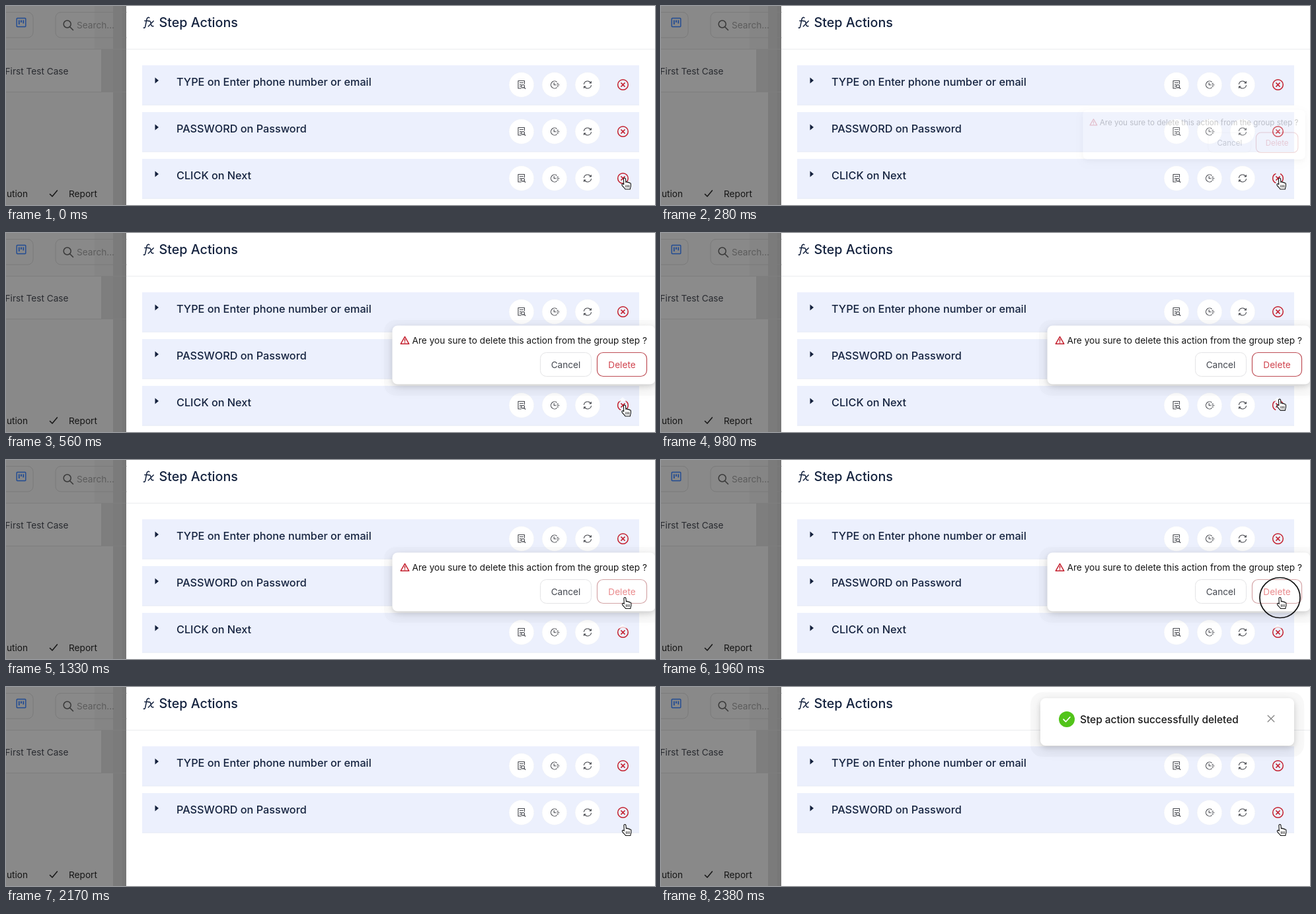
These frames come from a looping animation (982x302 px, 3500 ms). An HTML page:

```html
<!DOCTYPE html>
<html lang="en">
<head>
<meta charset="utf-8">
<title>Delete a step action</title>
<style>
html, body { margin: 0; width: 100%; height: 100%; overflow: hidden; background: #fff; }
svg { display: block; width: 982px; height: 302px; font-family: Inter, Roboto, sans-serif; }
.line { fill: none; stroke-linecap: round; stroke-linejoin: round; }
.icon { stroke: #45474d; stroke-width: 1.1; }
.red { stroke: #c4202e; stroke-width: 1.5; }
.body { font-size: 13.65px; }
.row { font-size: 16.24px; font-weight: 500; fill: #15233f; }
.card { fill: #fff; filter: drop-shadow(0 3px 4px rgba(0,0,0,.12)) drop-shadow(0 5px 9px rgba(0,0,0,.09)); }
</style>
</head>
<body>
<svg viewBox="0 0 982 302">
  <rect width="982" height="302" fill="#fff"/>

  <g id="backdrop">
    <rect width="182" height="302" fill="#898989"/>
    <rect y="66" width="182" height="64" fill="#8b8b8b"/>
    <path d="M134 0h48v66h-48z" fill="#858585"/>
    <path d="M144 66h38v64h-38z" fill="#7e7e7e"/>
    <path d="M162 0h20v302h-20z" fill="#7b7b7b"/>
    <path d="M176 0h6v302h-6z" fill="#777"/>
    <path d="M0 65.5H182M0 130.5H182" stroke="#7e7e7e"/>
    <g class="line" stroke="#7b7b7b">
      <path d="M-2 9.500H33a8 8 0 0 1 8 8V40a8 8 0 0 1-8 8H-2"/>
      <path d="M182 9.500H83a8 8 0 0 0-8 8V40a8 8 0 0 0 8 8H182"/>
    </g>
    <g class="line" stroke="#204b93" stroke-width="1.400">
      <rect x="16.200" y="18.500" width="13.600" height="13" rx="1"/>
      <path d="M19.800 21.500V28M23 21.500V25M26.300 21.500V26.500" stroke-width="1.800" stroke-linecap="butt"/>
    </g>
    <g class="line" stroke="#393939" stroke-width="1.500">
      <circle cx="92.700" cy="27.500" r="5.500"/><path d="M97 32l4.500 4.500"/>
    </g>
    <path class="line" d="M66.500 285.500l3.500 3.500 7.500-9" stroke="#161616" stroke-width="1.500"/>
    <g class="body" fill="#292b30">
      <text x="107" y="34" fill="#5c5c5c">Search...</text>
      <text x="94.500" y="103.500" text-anchor="end">First Test Case</text>
      <text x="33" y="289.500" text-anchor="end" fill="#151515">ution</text>
      <text x="95" y="289.500" fill="#151515">Report</text>
    </g>
  </g>

  <g class="line" stroke="#15233f" stroke-width="1.500">
    <path d="M217 17.800C214.800 16.600 213.300 18 212.800 20.800L210.900 30.500C210.500 32.900 209.700 33.600 208.200 33.100M209.800 22.500H215.600"/>
    <path d="M215.800 23C218.300 22 218.600 24 219.200 26.500S220.300 31.600 223 30.500M223.200 22.800L215.300 31"/>
  </g>
  <text x="231.500" y="32" font-size="19.700" font-weight="500" fill="#15233f">Step Actions</text>
  <path d="M182 65.500H982" stroke="#ebecef"/>

  <g id="rows"></g>

  <g id="popover">
    <rect x="572" y="132" width="424" height="115" rx="18" fill="#000" opacity=".015"/>
    <path d="M926.500 255.500l6.500-6.500 6.500 6.500z" fill="#fff" opacity=".7"/>
    <rect class="card" x="584.500" y="140.500" width="398" height="89" rx="8"/>
    <g class="line red" stroke-width="1.300">
      <path d="M603.500 157.300L609.800 168.300H597.200Z"/><path d="M603.500 161.300v3M603.500 166.300v.1"/>
    </g>
    <g class="body">
      <text x="614.500" y="168" font-size="13.700" fill="#161616">Are you sure to delete this action from the group step ?</text>
      <rect x="808.500" y="181.500" width="77" height="36" rx="9" fill="#fff" stroke="#e4e4e6"/>
      <text x="847" y="204.500" text-anchor="middle" fill="#43474f">Cancel</text>
      <rect id="deleteBox" x="894.500" y="181.500" width="75" height="36" rx="9" fill="#fff" stroke-width="1.200"/>
      <text id="deleteText" x="932" y="204.500" text-anchor="middle">Delete</text>
    </g>
  </g>

  <g id="toast">
    <rect x="559" y="8" width="414" height="98" rx="18" fill="#000" opacity=".025"/>
    <rect class="card" x="574" y="17" width="384" height="72" rx="8"/>
    <circle cx="614" cy="49" r="12" fill="#52c41a"/>
    <path class="line" d="M609 49.200l3.500 3.500 6.300-7" stroke="#fff" stroke-width="1.700"/>
    <text x="634" y="54.800" font-size="15.450" font-weight="500" fill="#1a1a1a">Step action successfully deleted</text>
    <path class="line" d="M918.200 43.200l9.600 9.600M927.800 43.200l-9.600 9.600" stroke="#858585" stroke-width="1.300"/>
  </g>

  <circle id="ring" r="30.500" fill="none" stroke="#111" stroke-width="1.700"/>
  <g id="cursor" class="line" stroke="#111">
    <path fill="#fff" stroke-width="1.100" d="M-1.600 1C-1.600-.9 1.400-.9 1.500 1L1.900 6C2.500 5 4.400 5.200 4.600 6.500C5.400 5.700 7 6 7.100 7.200C8.200 6.700 9.400 7.400 9.400 8.600V11.500C9.400 13 8.400 14 8.400 16.500H1C.4 15-3 12.500-4 10.200C-4.600 8.600-2.600 7.600-1.200 9.400Z"/>
    <path d="M2 10.500v3M4.300 10.500v3M6.600 10.500v3" stroke-width=".9"/>
  </g>
</svg>
<script>
const LOOP = 3500, STEP = 70;
const $ = id => document.getElementById(id);

const icons = [
  '<path d="M4.500-1.500V-6H-5V5.500H-.5M-2.500-3H2.500M-2.500 0H-.5M-2.500 2.500H-1"/><circle cx="2.200" cy="2.300" r="2.300"/><path d="M4 4.100L5.800 6"/>',
  '<path d="M3.300-4.400A5.500 5.500 0 1 0 3.300 4.400M-.8-3V.3H2M4-2H5.500M4 .3H7M4 2.500H5.500"/>',
  '<path d="M-5.500-1A5.600 5.600 0 0 1 4.900-2.600M5.500 1A5.600 5.600 0 0 1-4.900 2.600M5.400-5V-2.500H3M-5.400 5V2.500H-3"/>'
];

const row = (label, i) => `<g id="row${i}" transform="translate(0 ${90 + 71 * i})">
  <rect x="206" width="752" height="60.500" fill="#ecf0fd"/>
  <path d="M206 60H958" stroke="#e7ebf6"/>
  <path d="M225.500 18.500l5.500 4.500-5.500 4.500z" fill="#14213d"/>
  <text class="row" x="258" y="30.500">${label}</text>
  ${icons.map((icon, k) => `<g class="line icon" transform="translate(${780 + 50 * k} 29.500)">
    <circle r="19" fill="#fff" stroke="#ebeef6" stroke-width=".6"/>${icon}</g>`).join('')}
  <g class="line red" transform="translate(933.5 29.500)">
    <circle class="rim" r="7.800"/><path d="M-2.600-2.600L2.600 2.600M2.600-2.600L-2.600 2.600"/></g>
</g>`;
$('rows').innerHTML = ['TYPE on Enter phone number or email', 'PASSWORD on Password', 'CLICK on Next'].map(row).join('');
const rim = document.querySelector('#row2 .rim');

const clamp = x => Math.min(1, Math.max(0, x));
const span = (t, from, to) => clamp((t - from) / (to - from));
const mix = (a, b, p) => a + (b - a) * p;
const blend = (a, b, p) => `rgb(${a.map((v, i) => Math.round(mix(v, b[i], p)))})`;
const show = (id, on) => $(id).setAttribute('visibility', on ? 'visible' : 'hidden');
const place = (id, x, y) => $(id).setAttribute('transform', `translate(${x} ${y})`);

function bezier(x1, y1, x2, y2) {
  const at = (a, b, u) => 3 * a * u * (1 - u) ** 2 + 3 * b * u * u * (1 - u) + u ** 3;
  return x => {
    if (x <= 0 || x >= 1) return clamp(x);
    let lo = 0, hi = 1;
    for (let i = 0; i < 24; i++) {
      const mid = (lo + hi) / 2;
      if (at(x1, x2, mid) < x) lo = mid; else hi = mid;
    }
    return at(y1, y2, lo);
  };
}
const zoomIn = bezier(.08, .82, .17, 1);
const zoomOut = bezier(.78, .14, .15, .86);
const glide = bezier(.42, 0, .58, 1);
const slide = bezier(.645, .045, .355, 1);

function render(t) {
  const move = glide(span(t, 840, 1330));
  const x = mix(936, 936.5, move), y = mix(261.5, 209, move);
  place('cursor', x, y);
  place('ring', x, y);
  show('ring', (t >= 140 && t < 280) || (t >= 1960 && t < 2100));

  const open = zoomIn(span(t, 275, 475)) - zoomOut(span(t, 1965, 2165));
  const pop = $('popover');
  show('popover', open > .001);
  pop.setAttribute('opacity', open);
  pop.setAttribute('transform', `translate(933 250) scale(${mix(.8, 1, open)}) translate(-933 -250)`);

  const hover = span(t, 1150, 1330);
  $('deleteBox').setAttribute('stroke', blend([190, 78, 86], [212, 165, 167], hover));
  $('deleteText').setAttribute('fill', blend([208, 68, 78], [234, 138, 140], hover));

  // The popover tip clips the top of the hovered button.
  const clipped = t >= 280 && t < 1050;
  rim.setAttribute('stroke-dasharray', clipped ? '16.500 8' : 'none');
  rim.setAttribute('stroke-dashoffset', clipped ? 8.25 : 0);
  show('row2', t < 2170);

  const arrive = slide(span(t, 2180, 2380));
  show('toast', arrive > 0);
  $('toast').setAttribute('opacity', arrive);
  place('toast', 384 * (1 - arrive), 0);
}

const start = performance.now();
function tick() {
  const t = (performance.now() - start) % LOOP;
  render(Math.floor(t / STEP) * STEP);
  requestAnimationFrame(tick);
}
tick();
</script>
</body>
</html>
```
